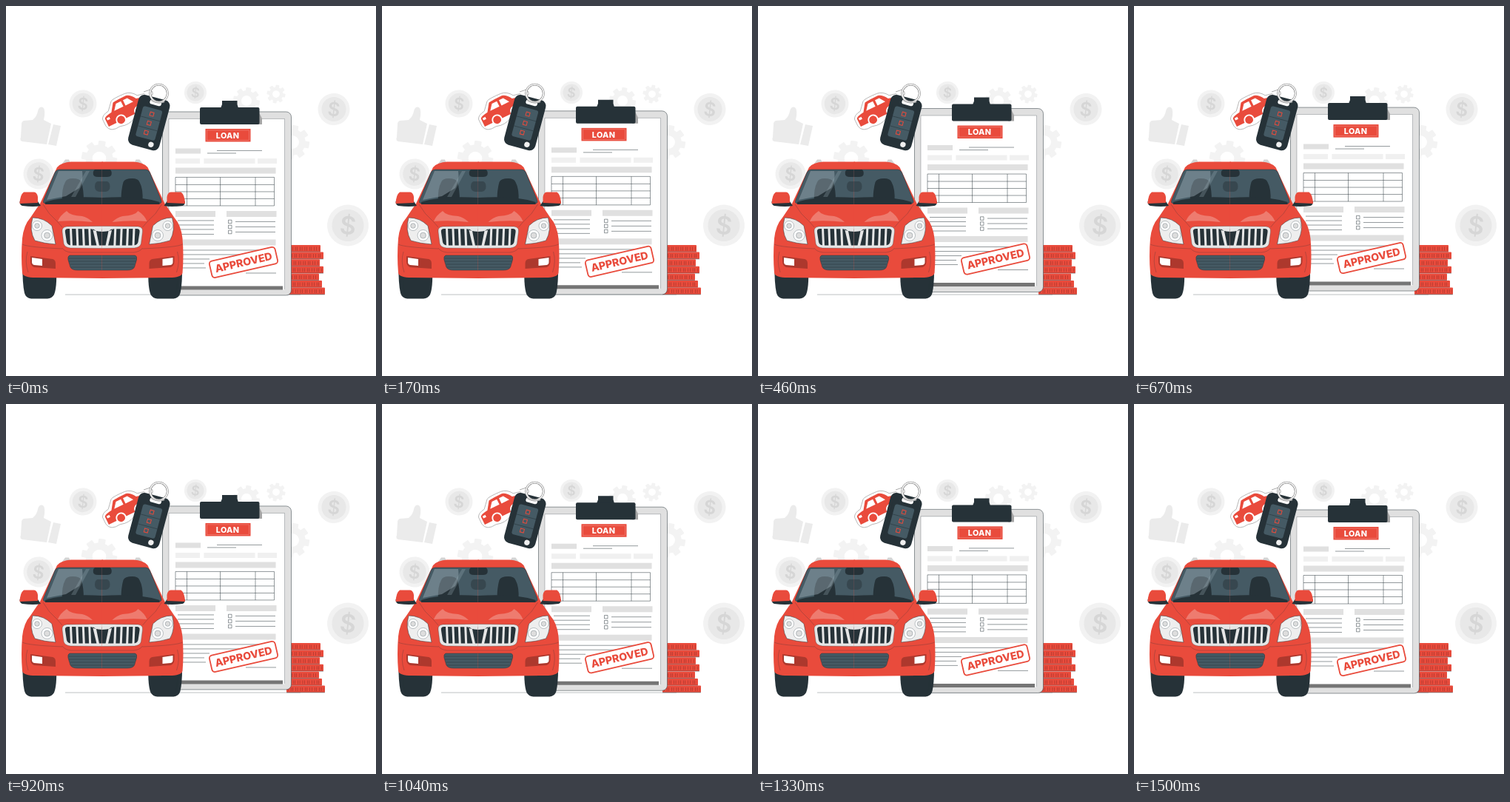
An HTML page that plays this animation: 500 px wide and 500 px high, repeating every 1.54 s.

```html
<!DOCTYPE html>
<html lang="en">
<head>
<meta charset="utf-8">
<title>Car loan</title>
<style>
  html, body { margin: 0; width: 100%; height: 100%; overflow: hidden; background: #fff; }
  svg { display: block; width: 100vw; height: 100vh; }
  text { font-family: Inter, "Open Sans", sans-serif; font-weight: 800; text-anchor: middle; }
  .red { fill: #e94b3c; }
  .dark { fill: #263238; }
  .slate { fill: #455a64; }
  .bar { fill: #e0e0e0; }
  .pale { fill: #f0f0f0; }
  .light { fill: #e6e6e6; }
  .line { fill: none; stroke: #263238; stroke-width: .5; }
  .edge { stroke: #263238; stroke-width: .5; }
</style>
</head>
<body>
<svg viewBox="0 0 500 500">
  <g id="backdrop">
    <path fill="#ebebeb" d="M24 155 L36 154 Q42 149 43 142 Q45 135 50 137 Q54 140 51 154 L61 159 L55 187 L22 183 Q18 182 20 177 L21 160 Q21 156 24 155Z M64 160 L74 162 L68 189 L57 187Z"/>
  </g>
  <path class="line" stroke-opacity=".6" d="M80 390H398"/>
  <g id="stack"></g>

  <g id="clipboard">
    <rect class="bar edge" x="211.5" y="143" width="174" height="248" rx="7"/>
    <path fill="#fff" d="M220 152.500H376.500V383.500H220Z"/>
    <path class="line" stroke-opacity=".55" d="M220 383V152.500H376.500V383"/>
    <path fill="#757575" d="M220 378.500H374V383.500H220Z"/>
    <path fill="#a6a6a6" d="M340 140L346 152V160H338Z"/>
    <path class="dark" d="M292 128H312.500V133L314 138H290L292 133Z"/>
    <rect class="dark" x="262" y="137" width="80.500" height="23" rx="2"/>
    <rect class="red" x="269.500" y="166" width="61" height="17.500"/>
    <rect x="271.500" y="168" width="57" height="13.500" fill="none" stroke="#fff" stroke-width=".4" opacity=".5"/>
    <text x="299.500" y="178.700" font-size="10.800" letter-spacing=".3" fill="#fff">LOAN</text>
    <path class="bar" d="M229 192.500h34v7h-34z M229 218.500h135.500v8h-135.500z M229 277h54v8h-54z M298 277h67.500v8h-67.500z M229 315.500h135.500v8h-135.500z"/>
    <path class="pale" d="M229 206h33v7h-33z M267.500 206h69v7h-69z M340 206h26v7h-26z"/>
    <g id="form" class="line"></g>
    <g transform="translate(321 346.500) rotate(-13)">
      <rect x="-45.500" y="-11.500" width="91" height="23" rx="4" fill="#fff" stroke="#e94b3c" stroke-width="1.800"/>
      <text class="red" y="5" font-size="14.200">APPROVED</text>
    </g>
  </g>

  <g id="keys">
    <g transform="translate(160 141) rotate(-26) scale(1.060)">
      <path fill="#fff" stroke="#aaa" stroke-width=".7" d="M-30 8V-2Q-28 -7 -19 -8L-10 -18Q-7 -20 10 -19Q18 -18 23 -10L32 -8V14Q17 18 8 14Q-2 20 -14 16Q-28 18 -30 8Z"/>
      <path class="red" d="M-27 9V-1Q-26 -4 -16 -5L-9 -15Q-8 -16 10 -16Q15 -15 20 -7L28 -5V10H-27Z"/>
      <path fill="#fff" d="M-12 -5L-6 -12.500H1V-5Z M4 -12.500H10L15 -5H4Z M-25 -1h4v3h-4z"/>
      <circle cx="-9" cy="9" r="6" class="red" stroke="#fff" stroke-width="1.800"/>
      <circle cx="17" cy="9" r="6" class="red" stroke="#fff" stroke-width="1.800"/>
    </g>
    <path fill="none" stroke="#999" stroke-width=".8" d="M186 116L195 113Q201 118 196 122"/>
    <g transform="translate(193 157.500) rotate(15)">
      <rect class="dark" x="-21.500" y="-35" width="43.500" height="70" rx="8"/>
      <rect class="slate" x="-13" y="-20" width="27" height="42" rx="3"/>
      <path class="line" d="M-13 -5.500H14M-13 8H14M-17 -22V25"/>
      <path fill="none" stroke="#e94b3c" d="M-1.500 -14.500h5v5h-5z M-2 -1.800h5v5h-5z M-2.500 11.500h5v5h-5z"/>
      <rect x="-6" y="-31" width="16" height="6" rx="3" fill="#fff"/>
      <circle cx="10.500" cy="28" r="3.700" fill="#f0f0f0"/>
    </g>
    <circle cx="206.500" cy="118" r="11.800" fill="none" stroke="#777" stroke-width="2.800"/>
    <circle cx="206.500" cy="118" r="11.800" fill="none" stroke="#f4f4f4" stroke-width="1.800"/>
    <path fill="none" stroke="#bbb" stroke-width="2" d="M196 127Q205 133 214 129"/>
  </g>

  <g id="car">
    <defs>
      <g id="half">
        <path class="dark" d="M22.500 350L68 355Q69 380 65 390Q62 395 56 395.500H34Q27 395 25 388Q22 375 22.500 350Z"/>
        <path class="line" stroke-opacity=".6" d="M29 372Q29 386 33 393"/>
        <path fill="#d4d4d4" d="M76 213L80 207.500H85L87 212Z"/>
        <path class="red" d="M131 210.500H88Q75 211 69 218L46 267Q39 277 33 286Q24 296 22 314Q20 338 22 361Q24 367 40 367L131 368Z"/>
        <path class="slate" d="M131 221H72Q68 221 66 225L51 262Q49 267 54 267H131Z"/>
        <path fill="#37474f" d="M131 237H124Q120 238 120 244Q120 250 126 251H131Z"/>
        <path class="dark" d="M76 264Q75 247 80 238Q82 233 90 233Q100 233 102 238Q105 248 105 264Z M131 221H120Q117 223 118 228Q119 231 124 231H131Z"/>
        <path class="dark" d="M53 265Q80 256 131 259V268H53Z"/>
        <path class="line" d="M131 221H72Q68 221 66 225L51 262Q49 267 54 267H131"/>
        <path fill="#ee7b6f" d="M82 277Q73 283 70 291Q92 289 117 292Q111 286 103 284Q86 283 82 277Z"/>
        <path class="line" stroke-opacity=".5" d="M50 268Q57 281 70 292L76 299 M22 322Q29 326 76 328 M76 327Q79 332 88 333H131 M29 332Q25 345 30 360"/>
        <path class="edge" fill="#eee" d="M36 286Q51 286 62 297L67 322Q52 321 39 317Q31 303 36 286Z"/>
        <g fill="#fff" stroke="#7b868c" stroke-width=".5">
          <circle cx="42" cy="297" r="6.500"/><circle cx="42" cy="297" r="3.300" fill="#ddd"/>
          <circle cx="55.500" cy="310" r="7.500"/><circle cx="55.500" cy="310" r="4" fill="#ddd"/>
        </g>
        <path fill="#ad382d" d="M33 338L63 342Q67 343 67 348V355L38 353Q33 351 33 345Z"/>
        <path fill="#fff" d="M35 340L49 342V351L38 350Q35 349 35 346Z"/>
        <path class="light" d="M131 297.500L82 298Q75 299 76 305L78 321Q79 326 87 327L131 327.500Z"/>
        <path class="line" stroke-opacity=".6" d="M131 297.500L82 298Q75 299 76 305L78 321Q79 326 87 327L131 327.500"/>
        <path class="dark" d="M131 301.500L84 301Q79 301 80 306L82 319Q83 323 88 323.500H131Z"/>
        <path class="light" d="M131 298H112L118 303Q125 305 131 305Z M117 301L122 304L126 324H122.500Z"/>
        <g id="bars" class="light"></g>
        <path class="slate" d="M131 337H86Q83 338 84 343L87 353Q89 357 97 357H131Z"/>
        <path class="line" d="M131 337H86Q83 338 84 343L87 353Q89 357 97 357H131M85 341H131M85 345H131M87 349H131M88 353H131"/>
        <path class="dark" d="M18.500 264L43 264L47 270Q38 272 22 270Q18.500 269 18.500 264Z"/>
        <path class="red" d="M24 251.500H38Q42 252 43 258V266L18.500 267Q19 255 24 251.500Z"/>
      </g>
    </defs>
    <use href="#half"/>
    <use href="#half" transform="translate(260.500) scale(-1 1)"/>
    <path fill="#a9bac2" opacity=".4" d="M71 223H103Q105 235 99 246L81 257L55 262Z"/>
    <path fill="#a9bac2" opacity=".25" d="M108 223H113L94 258H88Z"/>
  </g>
</svg>
<script>
  const LOOP = 1540, LIFT = 6, LEAD = 50;
  const byId = id => document.getElementById(id);
  const add = (id, markup) => byId(id).insertAdjacentHTML("beforeend", markup);

  function gear(x, y, r) {
    const teeth = Array.from({ length: 8 }, (_, i) =>
      `<rect x="${-r * .2}" y="${-r}" width="${r * .4}" height="${r * .5}" rx="1" transform="rotate(${i * 45 + 10})"/>`);
    return `<g transform="translate(${x} ${y})" fill="#f3f3f3">${teeth.join("")}
      <circle r="${r * .58}" fill="none" stroke="#f3f3f3" stroke-width="${r * .38}"/></g>`;
  }

  function coin(x, y, r) {
    return `<g transform="translate(${x} ${y}) rotate(6)"><circle r="${r}" fill="#f2f2f2"/>
      <circle r="${r * .77}" fill="#e8e8e8"/>
      <text y="${r * .43}" font-size="${r * 1.2}" fill="#d6d6d6" style="font-weight:600">$</text></g>`;
  }

  add("backdrop", [[126, 206, 24], [325, 128, 18], [365, 119, 12.5], [387, 184, 23]].map(g => gear(...g)).join("") +
    [[104, 132, 18.5], [256, 117, 15], [443, 139.5, 21.5], [462, 296.5, 28], [44, 227, 20.5]].map(c => coin(...c)).join(""));

  [[385, 425], [384, 429], [383, 424], [382, 429], [384, 423], [382, 427], [379, 431]].forEach(([left, right], i) => {
    const y = 323 + i * 9.6;
    add("stack", `<rect class="red" x="${left}" y="${y}" width="${right - left}" height="9.2" rx="1"/>
      <path d="M${left + 2} ${y + 5}H${right - 1}" fill="none" stroke="#8f2f27" stroke-width="5" stroke-dasharray=".5 3.4 .5 2"/>
      <path class="line" d="M${left} ${y + 9.2}H${right}"/>`);
  });

  const rule = (x1, x2, y) => `M${x1} ${y}H${x2}`;
  const form = [
    rule(285, 346, 195.5), rule(272, 311, 199),
    "M229 231.500H362.5V270H229Z M244.500 231.500V270 M289.500 231.500V270 M337 231.500V270",
    ...[241.5, 251, 260.5].map(y => rule(229, 362.5, y)),
    ...[290, 296, 302, 308.5].map(y => rule(232, 281, y)),
    ...[291.5, 298.5, 305.5].map(y => `M300.500 ${y - 2.2}h4.500v4.500h-4.500z` + rule(310, 364, y)),
    ...[[330, 364], [336, 330], [342, 275], [348, 268], [354, 270]].map(([y, end]) => rule(229, end, y)),
    rule(324, 365, 361)
  ];
  add("form", `<path d="${form.join("")}"/>`);

  for (let i = 0; i < 4; i++)
    add("bars", `<path d="M${86 + i * 8.4} 300h3l1 25h-3z"/>`);

  function draw(now) {
    const phase = (now % LOOP + LEAD) / LOOP * 2 * Math.PI;
    const y = -LIFT / 2 * (1 - Math.cos(phase));
    byId("clipboard").setAttribute("transform", `translate(0 ${y.toFixed(2)})`);
    requestAnimationFrame(draw);
  }
  draw(0);
</script>
</body>
</html>
```
